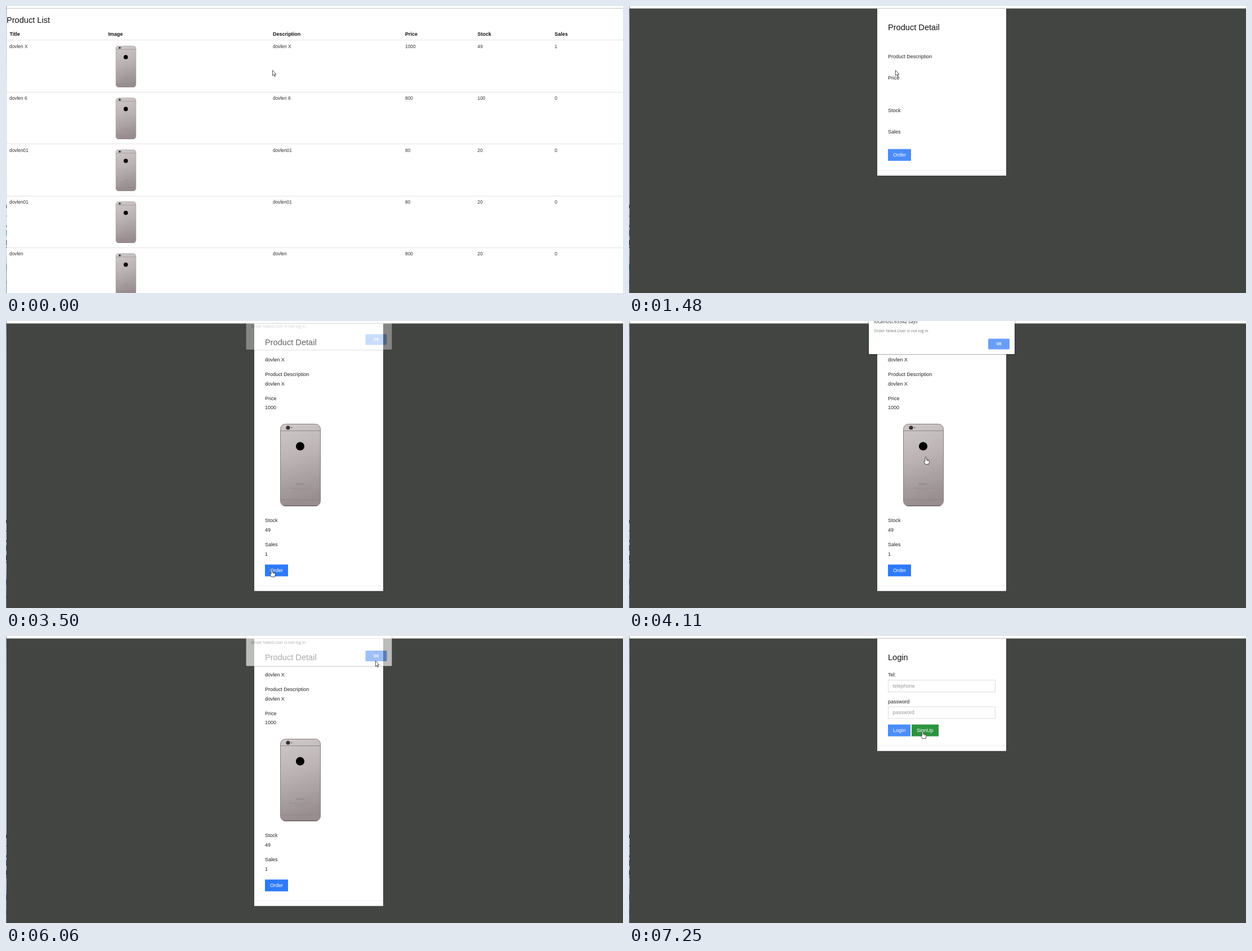
An HTML page that plays this animation: 1096 px wide and 511 px high, repeating every 8 s.

```html
<!DOCTYPE html>
<html lang="en">
<head>
<meta charset="utf-8">
<title>Product order</title>
<style>
  html, body { margin: 0; width: 100%; height: 100%; overflow: hidden; background: #fff; }
  svg { display: block; width: 100%; height: 100%; }
  text { font-family: "Liberation Sans", Arial, sans-serif; font-size: 8.96px; fill: #222; white-space: pre; }
  .h { font-size: 14.6px; fill: #111; }
  .th { font-weight: bold; fill: #111; }
  .td { font-size: 8.35px; fill: #333; }
  .hint { fill: #999; }
  .btn { fill: #fff; }
  .ui { font-family: "Open Sans", "Noto Sans", sans-serif; }
</style>
</head>
<body>
<svg id="stage" viewBox="0 0 1096 511" preserveAspectRatio="none">
  <defs>
    <linearGradient id="metal" x1="0" y1="0" x2=".15" y2="1">
      <stop offset="0" stop-color="#cfc9ca"/>
      <stop offset=".45" stop-color="#bbb3b4"/>
      <stop offset="1" stop-color="#988e90"/>
    </linearGradient>
    <linearGradient id="edge" x1="0" y1="0" x2="0" y2="1">
      <stop offset="0" stop-color="#8793ab"/>
      <stop offset=".06" stop-color="#b3bfd2"/>
      <stop offset=".3" stop-color="#c8d2e4"/>
      <stop offset=".85" stop-color="#c3d5e4"/>
      <stop offset=".92" stop-color="#6b9dbb"/>
      <stop offset="1" stop-color="#4f87a8"/>
    </linearGradient>
    <g id="phone">
      <rect x=".5" y=".5" width="71" height="146" rx="9" fill="url(#metal)" stroke="#857b7d"/>
      <path d="M1 12.5H71M1 135.5H71" stroke="#8f8587" stroke-width="1.2"/>
      <path d="M6 145.8H66" stroke="#776e70" stroke-width="1.4"/>
      <circle cx="14" cy="7" r="3.6" fill="#333"/>
      <circle cx="20.5" cy="7" r="1.1" fill="#6d6465"/>
      <circle cx="35.5" cy="40" r="7.6" fill="#000"/>
      <text x="35.5" y="109" text-anchor="middle" style="font-size:5px;fill:#847a7c">dovlen</text>
      <text x="35.5" y="115.5" text-anchor="middle" style="font-size:3.2px;fill:#928889">Made with care, series one</text>
      <text x="35.5" y="120" text-anchor="middle" style="font-size:3.2px;fill:#968c8d">Model 00 CE</text>
    </g>
  </defs>
  <rect width="1096" height="511" fill="#fff"/>
  <g id="list"></g>
  <g id="modal">
    <rect y="4" width="1096" height="507" fill="#434543"/>
    <g id="blank"></g>
    <g id="detail"></g>
    <g id="login"></g>
  </g>
  <rect y="3.6" width="1096" height="1.1" fill="#bfc3c1"/>
  <g id="border"><rect width="1" height="511" fill="url(#edge)"/></g>
  <g id="alert">
    <rect x="424.8" y="-12" width="261.4" height="72.6" rx="2" fill="#000" opacity=".14"/>
    <rect x="425.6" y="-12" width="259.8" height="71.8" rx="2" fill="#000" opacity=".22"/>
    <rect x="426" y="-12" width="259" height="71" rx="1.5" fill="#fff"/>
    <text class="ui" x="435" y="3.6" style="font-size:8.1px;fill:#333">localhost:63342 says</text>
    <text class="ui" x="435" y="19.6" style="font-size:7.1px;fill:#777">Order failed.User is not log in</text>
    <rect x="638" y="31.5" width="38" height="19" rx="2" fill="#689ef7"/>
    <text class="ui" x="657" y="43.4" text-anchor="middle" style="font-size:6.3px;font-weight:bold;fill:#fff">OK</text>
  </g>
  <g id="cursor">
    <g id="ring" fill="none">
      <circle r="8.3" stroke="#000"/>
      <circle r="7.4" stroke="#fff"/>
    </g>
    <path id="arrow" d="M.4.5V10L2.6 8 4.1 11.6 5.6 11 4.1 7.4H6.9Z" fill="#fff" stroke="#222" stroke-width=".8"/>
    <path id="hand" d="M-1.1 1.3Q0-.4 1.1 1.3V5.2L5 6.2Q6.8 6.8 6.5 9L5.5 13.6H-.6Q-2 11-3.4 9-3 7.2-1.1 8.8Z M2.6 5.8V7.8M4.4 6.3V8" fill="#fff" stroke="#222" stroke-width=".8"/>
  </g>
</svg>
<script>
const LOOP = 8000, BLUE = "#4a8dfc", BLUE_ON = "#2e7af9", GREEN = "#36a94a", GREEN_ON = "#2c943e";
const $ = id => document.getElementById(id);

function add(parent, tag, attrs, text) {
  const el = document.createElementNS("http://www.w3.org/2000/svg", tag);
  for (const k in attrs) el.setAttribute(k, attrs[k]);
  if (text !== undefined) el.textContent = text;
  return parent.appendChild(el);
}
const label = (g, x, y, text, cls = "") => add(g, "text", { x, y, class: cls }, text);
const box = (g, x, y, width, height, fill) => add(g, "rect", { x, y, width, height, fill });

function button(g, x, y, w, text, fill) {
  const rect = box(g, x, y, w, 21, fill);
  label(g, x + 9, y + 13.6, text, "btn");
  return rect;
}

function panel(g, bottom, title) {
  box(g, 441, 4, 229, bottom - 4, "#fff");
  box(g, 441, bottom - 10, 229, 1, "#f0f0f0");
  label(g, 460, 43, title, "h");
}

function buildList(g) {
  const cols = [6.5, 181.5, 474, 709, 837.5, 974.5];
  const rows = [
    ["dovlen X", 1000, 49, 1], ["dovlen 6", 800, 100, 0],
    ["dovlen01", 80, 20, 0], ["dovlen01", 80, 20, 0], ["dovlen", 800, 20, 0]
  ];
  label(g, 1, 30, "Product List", "h");
  ["Title", "Image", "Description", "Price", "Stock", "Sales"]
    .forEach((name, i) => label(g, cols[i], 53, name, "th"));
  rows.forEach(([name, ...nums], i) => {
    const y = 92.4 * i;
    box(g, 0, Math.round(60.3 + y), 1096, 1, "#e2e2e2");
    label(g, cols[0] - .5, y + 74.8, name, "td");
    add(g, "use", { href: "#phone", transform: `translate(195 ${y + 71}) scale(.5)` });
    label(g, cols[2], y + 74.8, name, "td");
    nums.forEach((n, k) => label(g, cols[k + 3], y + 74.8, n, "td"));
  });
}

function buildBlank(g) {
  panel(g, 302, "Product Detail");
  [["Product Description", 93], ["Price", 130.6], ["Stock", 189.4], ["Sales", 227]]
    .forEach(([text, y]) => label(g, 460, y, text));
  button(g, 460, 254.7, 41, "Order", BLUE);
}

function buildDetail(g) {
  panel(g, 480.7, "Product Detail");
  [["dovlen X", 72.3], ["Product Description", 98.2], ["dovlen X", 115], ["Price", 141], ["1000", 157.2],
   ["Stock", 358], ["49", 374.8], ["Sales", 401], ["1", 417.6]]
    .forEach(([text, y]) => label(g, 460, y, text));
  add(g, "use", { href: "#phone", transform: "translate(487 183)" });
  return button(g, 460, 433.6, 41, "Order", BLUE);
}

function buildLogin(g) {
  panel(g, 204.7, "Login");
  [["Tel:", "telephone", 78], ["password", "password", 125.4]].forEach(([name, hint, y]) => {
    label(g, 460, y - 5.7, name);
    add(g, "rect", { x: 460.5, y: y + .5, width: 190, height: 21, fill: "#fff", stroke: "#ddd" });
    label(g, 468.5, y + 13.8, hint, "hint");
  });
  button(g, 460, 157.6, 40, "LogIn", BLUE);
  return button(g, 502, 157.6, 48, "SignUp", GREEN);
}

buildList($("list"));
buildBlank($("blank"));
const order = buildDetail($("detail"));
const signUp = buildLogin($("login"));
[[354, 6], [373, 2], [390, 4], [399, 10], [417, 9], [428, 3], [460, 10], [489, 5]]
  .forEach(([y, h], i) => box($("border"), 0, y, 1, h, i % 4 ? "#2f7298" : "#2b4658"));

// Each move: start, end, number of steps, then [progress, x, y] points.
const moves = [
  [2080, 2860, 11, [[0, 473, 114], [.18, 508, 150], [.42, 533, 255], [8 / 11, 465, 416], [1, 469, 441.5]]],
  [2950, 3020, 2, [[0, 469, 441.5], [1, 472, 442]]],
  [3880, 4660, 11, [[0, 472, 442], [4 / 11, 527, 241.5], [.7, 558, 112], [1, 569, 60]]],
  [4740, 5220, 7, [[0, 569, 60], [.6, 636, 49], [1, 656, 45]]],
  [5440, 5440, 1, [[0, 656, 45], [1, 656, 44]]],
  [6600, 7250, 9, [[0, 656, 44], [.3, 618, 84], [.65, 546, 146], [8 / 9, 522, 172], [1, 521.5, 169]]]
];

function along(points, p) {
  const i = Math.max(1, points.findIndex(q => q[0] >= p - 1e-6));
  const a = points[i - 1], b = points[i], k = (p - a[0]) / (b[0] - a[0]);
  return [a[1] + (b[1] - a[1]) * k, a[2] + (b[2] - a[2]) * k];
}

function pointer(t) {
  const move = moves.filter(m => t >= m[0]).pop();
  if (!move) return [473, 114];
  const [start, end, steps, points] = move;
  const gap = (end - start) / (steps - 1) || 1;
  const done = Math.min(steps, Math.floor((t - start) / gap + .1) + 1);
  return along(points, done / steps);
}

// Returns the opacity and upward shift of the alert.
function alertPose(t) {
  if (t < 3490 || t >= 6230) return [0, 0];
  if (t < 3570) return [.35, -8];
  if (t < 3660) return [.8, -3];
  if (t < 6060) return [1, 0];
  return t < 6150 ? [.64, -5.5] : [.25, -9];
}

const show = (id, on) => $(id).style.display = on ? "" : "none";
const between = (t, a, b) => t >= a && t < b;

function render(t) {
  const [x, y] = pointer(t), [alpha, shift] = alertPose(t);
  const onOrder = t >= 2080 && y > 434;
  const onSignUp = t >= 6600 && between(x, 502, 550) && between(y, 158, 179);
  const stuckHand = between(t, 3400, 4700) && y > 62;

  show("list", t < 1480);
  show("modal", t >= 1480);
  show("blank", between(t, 1480, 1630));
  show("detail", between(t, 1630, 6230));
  show("login", t >= 6230);
  order.setAttribute("fill", onOrder || t >= 3330 ? BLUE_ON : BLUE);
  signUp.setAttribute("fill", onSignUp ? GREEN_ON : GREEN);

  show("alert", alpha > 0);
  $("alert").setAttribute("opacity", alpha);
  $("alert").setAttribute("transform", `translate(${shift ? .5 : 0} ${shift})`);

  const hand = onOrder || onSignUp || stuckHand;
  show("hand", hand);
  show("arrow", !hand);
  show("ring", between(t, 1010, 1180) || between(t, 3330, 3410) || between(t, 5820, 5990));
  $("cursor").setAttribute("transform", `translate(${x} ${y})`);
}

const began = performance.now();
function tick() {
  render((performance.now() - began) % LOOP);
  requestAnimationFrame(tick);
}
tick();
</script>
</body>
</html>
```
